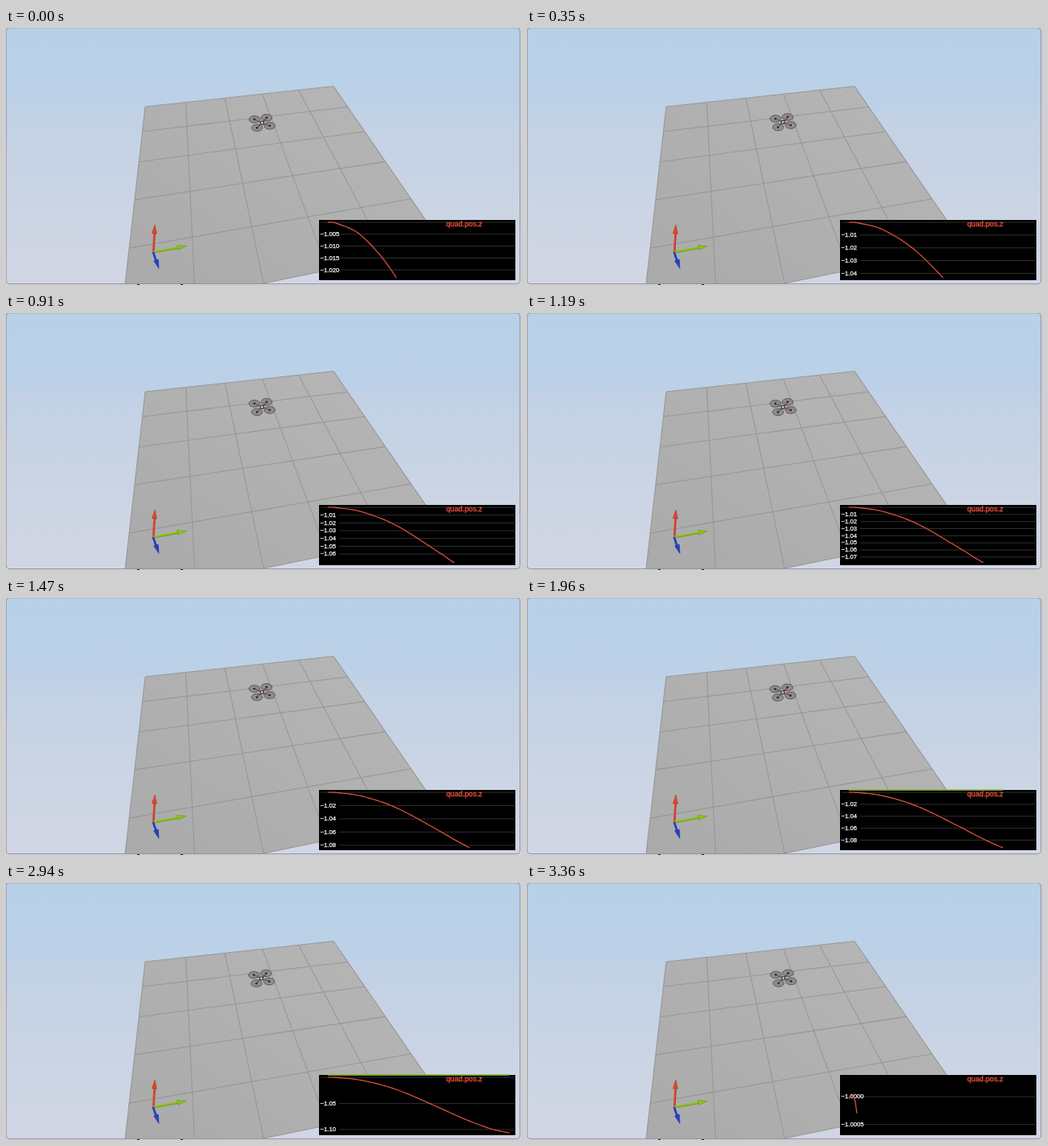
Animation, 640 px wide and 320 px high, one loop 3430 ms. Source, as an HTML page:

```html
<!DOCTYPE html>
<html lang="en">
<head>
<meta charset="utf-8">
<title>Quadcopter altitude</title>
<style>
  html, body { margin: 0; width: 100%; height: 100%; overflow: hidden; background: #d2d6e0; }
  svg { display: block; width: 640px; height: 320px; }
  text { font-family: "Liberation Sans", Arial, sans-serif; }
  .grid { stroke: #979797; stroke-width: 1.1; fill: none; }
  .tick { stroke: #303030; stroke-width: 1; }
  .label { fill: #fff; stroke: #fff; stroke-width: .25; font-size: 7.7px; }
  .title { fill: #f4503c; stroke: #f4503c; stroke-width: .3; font-size: 9.2px; }
  .curve { fill: none; stroke: #e8543f; stroke-width: 1.2; }
</style>
</head>
<body>
<svg viewBox="0 0 640 320">
  <defs>
    <linearGradient id="sky" x2="0" y2="1">
      <stop offset="0" stop-color="#b8d0e8"/>
      <stop offset=".3" stop-color="#bcd1e7"/>
      <stop offset=".31" stop-color="#c1d1e5"/>
      <stop offset=".75" stop-color="#ccd5e4"/>
      <stop offset="1" stop-color="#d2d6e4"/>
    </linearGradient>
    <linearGradient id="ground" x1="0" y1="1" x2="1" y2="0">
      <stop offset="0" stop-color="#a9a9a9"/>
      <stop offset=".5" stop-color="#b0b0b0"/>
      <stop offset="1" stop-color="#b7b7b7"/>
    </linearGradient>
    <clipPath id="view"><rect width="639" height="318.5" rx="4"/></clipPath>
    <clipPath id="panel"><rect x="389" y="238" width="244" height="76"/></clipPath>
  </defs>
  <g clip-path="url(#view)">
    <rect width="640" height="320" fill="url(#sky)"/>
    <g id="floor"></g>
    <g id="axes"></g>
    <g id="drone"></g>
  </g>
  <rect x=".2" y="-.2" width="638.6" height="318.8" rx="4" fill="none" stroke="#858b95" stroke-width=".9"/>
  <path d="M163 319.5h3M217 319.5h3" stroke="#222"/>
  <rect x="389" y="239" width="244" height="75" fill="#000"/>
  <g id="plot" clip-path="url(#panel)"></g>
  <text class="title" x="547" y="247">quad.pos.z</text>
</svg>
<script>
const FRAME = 70, COUNT = 49, RESET = 44;
const LEFT = 400, TOP = 242, HEIGHT = 69;
const $ = id => document.getElementById(id);

// Key tables: frame -> plot head x, frame -> drone centre, plot x -> climb
const HEAD = [[0, 485], [9, 541], [13, 557], [21, 576], [28, 591.5], [34, 606], [43, 628]];
const HOVER_X = [[0, 318], [13, 318], [21, 317.9], [34, 317.4], [43, 317.3]];
const HOVER_Y = [[0, 118], [4, 117.3], [9, 116.8], [13, 117], [21, 117.2], [28, 117.6], [34, 118.3], [43, 118.8]];
const CLIMB = [[0, 0], [10, .0003], [42, .0057], [85, .0233], [141, .0599], [157, .0713],
  [176, .0838], [191.5, .0928], [206, .1002], [228, .107]];

// Cubic Hermite through the points, slopes from neighbours
function spline(pts, x) {
  const last = pts.length - 1;
  let i = 0;
  while (i < last - 1 && x > pts[i + 1][0]) i++;
  const slope = k => {
    const a = pts[Math.max(k - 1, 0)], b = pts[Math.min(k + 1, last)];
    return k === 0 && pts === CLIMB ? 0 : (b[1] - a[1]) / (b[0] - a[0]);
  };
  const [x0, y0] = pts[i], [x1, y1] = pts[i + 1];
  const w = x1 - x0, s = (x - x0) / w, r = 1 - s;
  return y0 * (1 + 2 * s) * r * r + slope(i) * w * s * r * r +
    y1 * s * s * (3 - 2 * s) - slope(i + 1) * w * s * s * r;
}

// Perspective of the unit square onto the ground
function ground(u, v) {
  const w = 1 + .0987 * u - .4488 * v;
  return [(173 + 274.2 * u - 93.6 * v) / w, (98 - 18.3 * u + 97.1 * v) / w];
}

function drawFloor() {
  const corners = [ground(0, 0), ground(1, 0), ground(1, 1), ground(0, 1)];
  let d = "";
  for (let i = 0; i <= 5; i++) {
    const k = i / 5;
    d += `M${ground(k, 0)}L${ground(k, 1)}M${ground(0, k)}L${ground(1, k)}`;
  }
  $("floor").innerHTML = `<polygon points="${corners.join(" ")}" fill="url(#ground)"/><path class="grid" d="${d}"/>`;
}

function arrow(x, y, color, edge) {
  const ox = 183, oy = 279, len = Math.hypot(x - ox, y - oy);
  const angle = Math.atan2(y - oy, x - ox) * 180 / Math.PI;
  const neck = len - 11;
  return `<g transform="translate(${ox} ${oy}) rotate(${angle})">
    <path d="M0 0H${neck}" stroke="${color}" stroke-width="2.4"/>
    <path d="M0 1H${neck}" stroke="${edge}" stroke-width=".7"/>
    <path d="M${neck} -3L${len} 0L${neck} 3Z" fill="${color}" stroke="${edge}" stroke-width=".5"/></g>`;
}

function drawAxes() {
  $("axes").innerHTML = arrow(185, 245, "#e2452c", "#a83220") +
    arrow(224, 271.5, "#8fc414", "#648c10") + arrow(190, 299.5, "#2342cc", "#1a2f94");
}

function drawDrone() {
  const rotors = [[-9.2, -4.2], [5.9, -6.3], [-6, 6.3], [9.7, 3.8]];
  const arms = rotors.map(([x, y], i) =>
    `<path d="M0 0L${x} ${y}" stroke="${i % 2 ? "#6a4a4a" : "#555"}" stroke-width="1.1"/>`).join("");
  const discs = rotors.map(([x, y]) =>
    `<ellipse cx="${x}" cy="${y}" rx="6.8" ry="4.3" fill="#858585" fill-opacity=".8" stroke="#505050" stroke-width=".9"/>
     <circle cx="${x}" cy="${y}" r="1.3" fill="#151515"/>`).join("");
  $("drone").innerHTML = discs + arms +
    `<path d="M2.5 -1.5L5.5 -4" stroke="#b8413c" stroke-width="1.1"/>
     <path d="M-6 -3L-3.5 -1.8" stroke="#a84a44"/>
     <rect x="-2.4" y="-2.2" width="5" height="4.4" fill="#303440"/>
     <rect x="-1.2" y="-1.1" width="2.6" height="2.2" fill="#d4d8e6"/>
     <path d="M-1.5 2.2H2" stroke="#4a56a0" stroke-width=".8"/>`;
}

function tickStep(span) {
  const base = 10 ** Math.floor(Math.log10(span) + 1e-6), lead = span / base;
  return base * (lead < 4 ? .5 : lead < 8 ? 1 : 2);
}

function drawPlot(n, head) {
  const depth = spline(CLIMB, head - LEFT), span = Math.max(depth, .001);
  const top = (span - depth) / 2;
  const toY = z => TOP + (z + top) / span * HEIGHT;
  const step = tickStep(span), digits = Math.ceil(-Math.log10(step) - 1e-6);
  let out = "";
  for (let k = 0; toY(k * step) < 309; k++) {
    const y = toY(k * step), shown = y > 246;
    const text = (-1 - k * step).toFixed(digits).replace("-", "−");
    out += `<path class="tick" d="M${shown ? 414 : 391} ${y}H632"/>`;
    if (shown) out += `<text class="label" x="390.5" y="${y + 2.3}">${text}</text>`;
  }
  const pts = [];
  for (let x = LEFT; x < head; x += 2) pts.push([x, toY(spline(CLIMB, x - LEFT))]);
  pts.push([head, toY(depth)]);
  out += `<polyline class="curve" points="${pts.join(" ")}"/>`;
  if (n >= 24 && n < RESET) out += `<rect x="400" y="238.4" width="${head - LEFT}" height="1.4" fill="#7fb51c"/>`;
  $("plot").innerHTML = out;
}

function render(n) {
  const fresh = n >= RESET;
  const head = fresh ? LEFT + 2.5 * (n - RESET) : spline(HEAD, n);
  const x = fresh ? 318.5 : spline(HOVER_X, n);
  const y = fresh ? 118.5 : spline(HOVER_Y, n);
  $("drone").setAttribute("transform", `translate(${x} ${y})`);
  drawPlot(n, head);
}

drawFloor();
drawAxes();
drawDrone();

const start = performance.now();
let shown = -1;
function tick() {
  const n = Math.floor((performance.now() - start) / FRAME) % COUNT;
  if (n !== shown) render(shown = n);
  requestAnimationFrame(tick);
}
tick();
</script>
</body>
</html>
```
